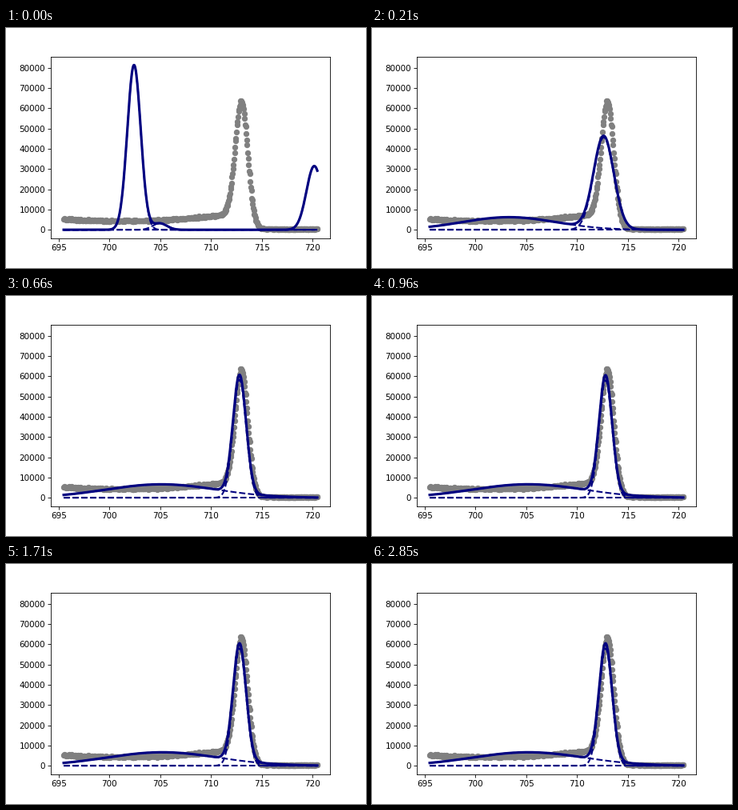
Animation of 450x300 px, one loop 3630 ms. Source, as a matplotlib script:

```python
import numpy as np
import matplotlib.pyplot as plt
from matplotlib.animation import FuncAnimation

FRAMES, STEP_MS, LAST_STEP = 121, 30, 95
AREA = 185000


def gauss(x, mean, sigma):
    return np.exp(-0.5 * ((x - mean) / sigma) ** 2)


def fall(x, middle, width):
    """Smooth step from 1 down to 0."""
    return 1 / (1 + np.exp((x - middle) / width))


def spectrum(x):
    """Skewed peak on a curved background that drops behind it."""
    background = (4050 + 29 * (x - 701.2) ** 2) * fall(x, 713.6, 0.4)
    sigma = np.where(x < 713, 0.63, 0.6)
    y = background + 56100 * gauss(x, 713, sigma) + 300
    noise = np.random.default_rng(4).normal(0, 3, x.size)
    return np.maximum(y + noise * np.sqrt(y), 0)


def components(step):
    """Height, mean and sigma of the three peaks at a fit step."""
    if step == 0:
        return [(81420, 702.42, 0.66), (3200, 704.95, 0.7),
                (31500, 720.15, 0.77)]
    fast, slow = fall(step, 4.5, 3), fall(step, 4.5, 4.5)
    broad_area = 92000 - 55000 * slow
    peaks = [(broad_area, 705.2 - 5.2 * slow, 5.5 - 2.45 * slow),
             (AREA - broad_area, 712.8 - 0.6 * fast, 0.64 + 1.15 * fast),
             (0, 705, 1)]
    return [(area / (sigma * np.sqrt(2 * np.pi)), mean, sigma)
            for area, mean, sigma in peaks]


x = np.arange(500) * 0.05 + 695.5

fig, ax = plt.subplots(figsize=(6, 4), dpi=75)
fig.subplots_adjust(left=0.125, right=0.9, bottom=0.125, top=0.88)
ax.plot(x, spectrum(x), "o", color="gray")
parts = [ax.plot(x, 0 * x, "--", color="navy", lw=2)[0] for _ in range(3)]
total, = ax.plot(x, 0 * x, color="navy", lw=3)
margin = 0.05 * (x[-1] - x[0])
ax.set_xlim(x[0] - margin, x[-1] + margin)
ax.set_ylim(-0.05 * 81400, 1.05 * 81400)


def update(i):
    curves = [h * gauss(x, mean, sigma)
              for h, mean, sigma in components(min(i, LAST_STEP))]
    for line, curve in zip(parts, curves):
        line.set_ydata(curve)
    total.set_ydata(sum(curves))
    return [*parts, total]


anim = FuncAnimation(fig, update, frames=FRAMES, interval=STEP_MS,
                     init_func=lambda: update(0), repeat=True,
                     repeat_delay=0, blit=False)
plt.show()
```
